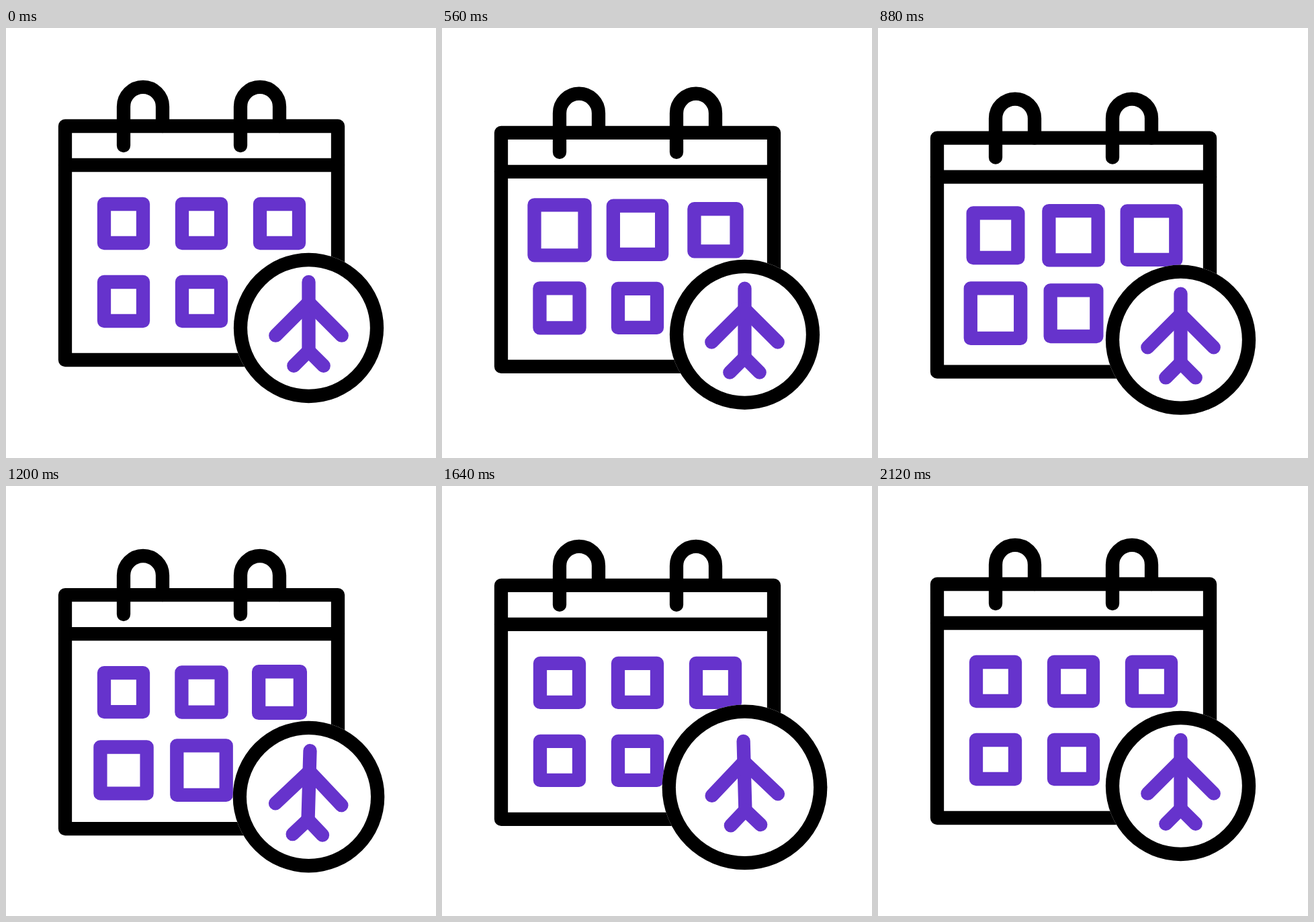
An HTML page with a canvas for the animation above (2240 ms loop, 640 px wide and 640 px high).

```html
<!DOCTYPE html>
<html lang="en">
<head>
<meta charset="utf-8">
<title>Travel calendar</title>
<style>
  html, body { margin: 0; width: 100%; height: 100%; overflow: hidden; background: #fff; }
  canvas { display: block; width: 640px; height: 640px; }
</style>
</head>
<body>
<canvas id="stage" width="640" height="640"></canvas>
<script>
const ctx = document.getElementById('stage').getContext('2d');
const LOOP = 2240, STEP = 40, LINE = 20.3;
const INK = '#000', ACCENT = '#6633cc';

// x, y, growth, start, peak, end (ms)
const days = [
  [175, 291, 17.4, 100, 620, 1140],
  [291, 291, 17.4, 217, 718, 1323],
  [407, 291, 14.6, 335, 865, 1395],
  [175, 407, 17.4, 458, 978, 1498],
  [291, 407, 16.4, 580, 1100, 1620]
];

// cubic-bezier(.5, 0, .5, 1)
function ease(x) {
  if (x <= 0) return 0;
  if (x >= 1) return 1;
  let lo = 0, hi = 1;
  for (let i = 0; i < 24; i++) {
    const s = (lo + hi) / 2;
    const bx = 1.5 * s * (1 - s) * (1 - s) + 1.5 * s * s * (1 - s) + s * s * s;
    if (bx < x) lo = s; else hi = s;
  }
  return lo * lo * (3 - 2 * lo);
}

const ramp = (t, a, b) => ease((t - a) / (b - a));
const pulse = (t, a, peak, b) => ramp(t, a, peak) - ramp(t, peak, b);

function line(color, ...points) {
  ctx.strokeStyle = color;
  ctx.beginPath();
  points.forEach(([x, y]) => ctx.lineTo(x, y));
  ctx.stroke();
}

function hook(x) {
  ctx.strokeStyle = INK;
  ctx.beginPath();
  ctx.moveTo(x, 175);
  ctx.arc(x + 29, 116.9, 29, Math.PI, 0);
  ctx.lineTo(x + 58, 146);
  ctx.stroke();
}

function calendar(t) {
  ctx.strokeStyle = INK;
  ctx.strokeRect(88, 146, 406, 348);
  line(INK, [88, 204], [494, 204]);
  hook(175);
  hook(349);
  ctx.strokeStyle = ACCENT;
  for (const [x, y, grow, a, peak, b] of days) {
    const size = 58 + grow * pulse(t, a, peak, b);
    ctx.strokeRect(x - size / 2, y - size / 2, size, size);
  }
}

function disc(r, color) {
  ctx.fillStyle = color;
  ctx.beginPath();
  ctx.arc(0, 0, r, 0, 2 * Math.PI);
  ctx.fill();
}

function badge(t) {
  const r = 101.5 + 11.3 * pulse(t, 1065, 1610, 2130);
  const tilt = 5.2 * (ramp(t, 1090, 1360) - 2 * ramp(t, 1360, 1845) + ramp(t, 1845, 2130));
  ctx.save();
  ctx.translate(450.5, 446.5);
  disc(r + LINE / 2, '#fff');
  disc(r + LINE / 2, INK);
  disc(r - LINE / 2, '#fff');
  ctx.rotate(tilt * Math.PI / 180);
  line(ACCENT, [0, -68.6], [0, 34.1]);
  line(ACCENT, [-49.2, 11.2], [0, -38], [49.2, 11.2]);
  line(ACCENT, [-22.2, 56.3], [0, 34.1], [22.2, 56.3]);
  ctx.restore();
}

function draw(t) {
  ctx.fillStyle = '#fff';
  ctx.fillRect(0, 0, 640, 640);
  ctx.lineWidth = LINE;
  ctx.lineCap = ctx.lineJoin = 'round';
  ctx.save();
  ctx.translate(0, 18 * pulse(t, 100, 980, 1860));
  calendar(t);
  badge(t);
  ctx.restore();
}

const begin = performance.now();
function tick() {
  const t = (performance.now() - begin) % LOOP;
  draw(Math.floor(t / STEP) * STEP);
  requestAnimationFrame(tick);
}
tick();
</script>
</body>
</html>
```
